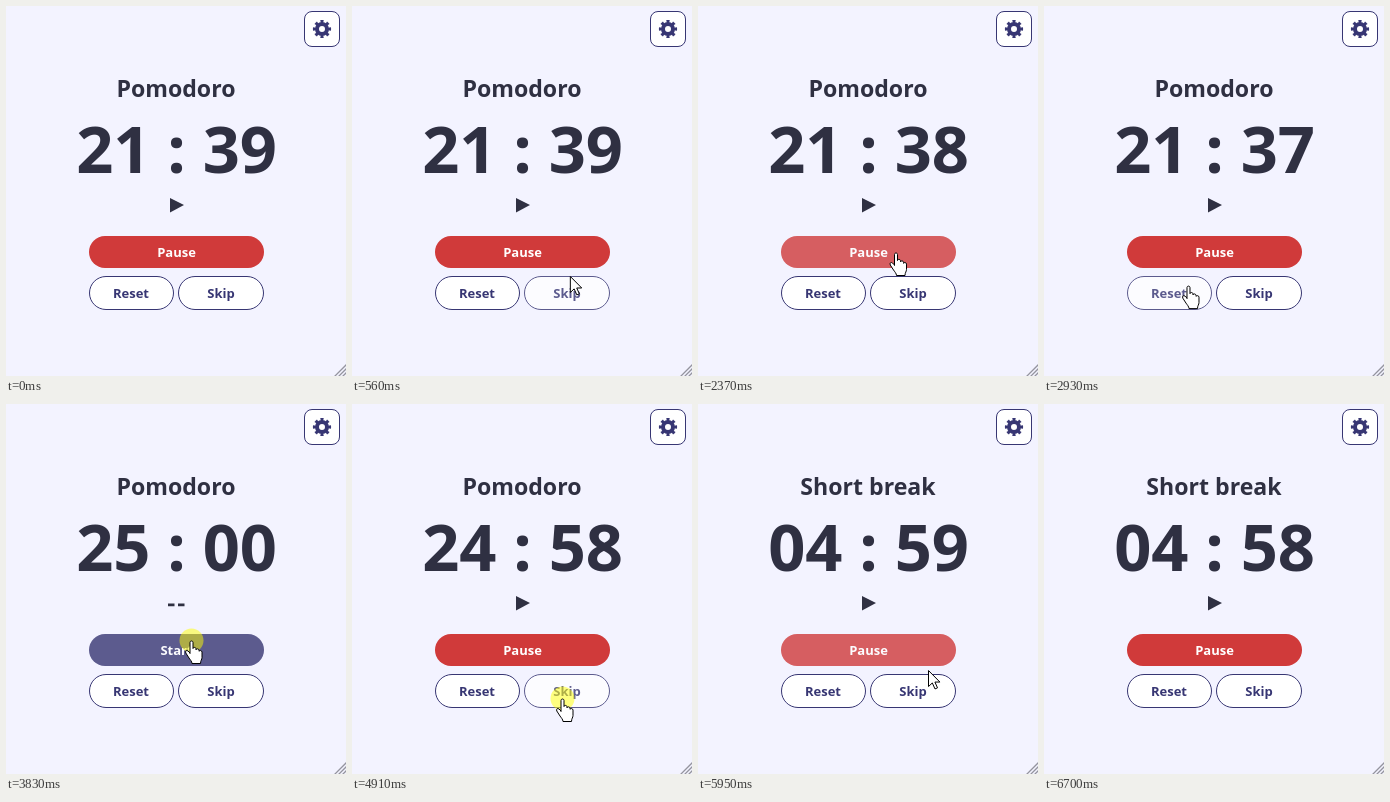
An HTML page for the animation above (7030 ms loop, 340 by 370 pixels).

```html
<!DOCTYPE html>
<html lang="en">
<head>
<meta charset="utf-8">
<title>Timer</title>
<style>
  html, body { margin: 0; width: 100%; height: 100%; overflow: hidden; background: #f3f3ff; }
  svg { display: block; width: 340px; height: 370px; }
  text { font-family: "Open Sans", "Noto Sans", sans-serif; font-weight: 700; text-anchor: middle; fill: #2f3042; }
  #title { font-size: 23.1px; }
  #clock { font-size: 65px; }
  #icon { fill: #2f3042; }
  .button text { font-size: 13px; fill: #373673; }
  .button rect, .frame { fill: #fff; stroke: #373673; }
  #main text { fill: #fff; }
  #main rect { stroke: none; fill: #373673; }
  #main.running rect { fill: #d03a3a; }
  .hover { opacity: .8; }
  .gear { fill: none; stroke: #373673; }
  .grip { fill: none; stroke: #94949e; stroke-width: 1.3; }
  #pointer path { fill: #fff; stroke: #000; stroke-linejoin: round; }
</style>
</head>
<body>
<svg viewBox="0 0 340 370">
  <rect width="340" height="370" fill="#f3f3ff"/>
  <rect class="frame" x="298.5" y="5.5" width="35" height="35" rx="7.5"/>
  <g class="gear" transform="translate(316 23)">
    <circle r="5" stroke-width="4"/>
    <circle r="7.6" stroke-width="3" pathLength="8" stroke-dasharray=".5 .5" stroke-dashoffset=".25"/>
  </g>
  <path class="grip" d="M328.5 370.5l12-12M332.5 370.5l8-8M336.5 370.5l4-4"/>

  <text id="title" x="170" y="91"></text>
  <text id="clock" x="170.5" y="167"></text>
  <path id="icon"/>

  <g class="button" id="main">
    <rect x="83" y="230" width="175" height="32" rx="16"/>
    <text x="170.5" y="251"></text>
  </g>
  <g class="button" id="reset">
    <rect x="83.5" y="270.5" width="84" height="33" rx="16.5"/>
    <text x="125" y="292">Reset</text>
  </g>
  <g class="button" id="skip">
    <rect x="172.5" y="270.5" width="85" height="33" rx="16.5"/>
    <text x="215" y="292">Skip</text>
  </g>

  <g id="pointer">
    <circle id="ripple" r="12" fill="#ff0" opacity=".5"/>
    <path id="hand" d="M-1.5 13V2c0-2 3-2 3 0v6c0-1.5 3-1.5 3 .3v1c.3-1.5 3-1.2 3 .5v1c.5-1.2 3-1 3 .8V17c0 2-1.5 3-1.5 6H.5c0-2-2-4-3-5.5l-3.2-5c-1-2 1-3.2 2.2-2l2 2z"/>
    <path id="arrow" d="M0 .5v16l3.8-3.6 2.7 6 2.5-1.1-2.6-5.8h5z"/>
  </g>
</svg>
<script>
const LOOP = 7030, STEP = 70;
const SECOND = 950;

const MODES = {
  run:   { label: "Pause",    icon: "M164 192l14 7-14 7.5z" },
  pause: { label: "Continue", icon: "M164 191.5h4v16h-4zM172 191.5h4v16h-4z" },
  idle:  { label: "Start",    icon: "M162 199.5h6.5v2.8H162zM172 199.5h6.5v2.8H172z" }
};

// Where the pointer rests, and when it presses and releases there.
const STOPS = [
  { x: 298,   y: 362,   leave: 70, presses: [] },
  { x: 198,   y: 246.5, arrive: 760,  leave: 2370, presses: [[830, 900], [1700, 1770]] },
  { x: 139,   y: 283,   arrive: 3060, leave: 3270, presses: [[3200, 3270]] },
  { x: 185.5, y: 236.5, arrive: 3760, leave: 3960, presses: [[3830, 3960]] },
  { x: 210.5, y: 294.5, arrive: 4380, leave: 4980, presses: [[4910, 4980]] },
  { x: 215,   y: 244,   arrive: 5400, leave: 5740, presses: [[5670, 5740]] },
  { x: 298,   y: 362,   arrive: 6500, presses: [] }
];
const ENTER = STOPS[0].leave, EXIT = STOPS[STOPS.length - 1].arrive;
const PRESSES = STOPS.flatMap(stop =>
  stop.presses.map(([down, up]) => ({ down, up, button: buttonAt(stop) })));

const $ = id => document.getElementById(id);
const show = (el, on) => el.style.display = on ? "" : "none";
const ease = k => k * k * (3 - 2 * k);

function buttonAt({ x, y }) {
  if (x < 83 || x > 258) return "";
  if (y >= 230 && y <= 262) return "main";
  if (y < 270 || y > 304) return "";
  return x <= 168 ? "reset" : x >= 172 ? "skip" : "";
}

function pointerAt(t) {
  const next = STOPS.findIndex(stop => stop.arrive > t);
  if (next < 0) return STOPS[STOPS.length - 1];
  const from = STOPS[next - 1], to = STOPS[next];
  const elapsed = Math.max(0, Math.floor((t - from.leave) / STEP) * STEP);
  const k = ease(elapsed / (to.arrive - from.leave));
  return { x: from.x + (to.x - from.x) * k, y: from.y + (to.y - from.y) * k };
}

// Replays every finished press up to t on the countdown.
function timerAt(t) {
  const timer = { title: "Pomodoro", left: 21 * 60 + 39.73, mode: "run" };
  let since = 0;
  const advance = now => {
    if (timer.mode === "run") timer.left -= (now - since) / SECOND;
    since = now;
  };
  for (const { up, button } of PRESSES.filter(press => press.up <= t)) {
    advance(up);
    if (button === "main") timer.mode = timer.mode === "run" ? "pause" : "run";
    if (button === "reset") Object.assign(timer, { left: 25 * 60, mode: "idle" });
    if (button === "skip") Object.assign(timer, { title: "Short break", left: 5 * 60, mode: "idle" });
  }
  advance(t + 1);
  return timer;
}

function clockText(left) {
  const seconds = Math.floor(left);
  return [seconds / 60, seconds % 60].map(n => String(Math.floor(n)).padStart(2, "0")).join(" : ");
}

function draw(t) {
  const { title, left, mode } = timerAt(t);
  $("title").textContent = title;
  $("clock").textContent = clockText(left);
  $("icon").setAttribute("d", MODES[mode].icon);
  $("main").querySelector("text").textContent = MODES[mode].label;
  $("main").classList.toggle("running", mode === "run");

  const visible = t >= ENTER && t < EXIT;
  const tip = pointerAt(t);
  const over = buttonAt(tip);
  const hovered = visible && buttonAt(pointerAt(t - STEP)); // hover trails by one step
  for (const id of ["main", "reset", "skip"]) $(id).classList.toggle("hover", id === hovered);

  show($("pointer"), visible);
  $("pointer").setAttribute("transform", `translate(${tip.x} ${tip.y})`);
  show($("hand"), over);
  show($("arrow"), !over);
  show($("ripple"), PRESSES.some(({ down, up }) => t >= down && t < up));
}

const begin = performance.now();
function tick() {
  draw((performance.now() - begin) % LOOP);
  requestAnimationFrame(tick);
}
tick();
</script>
</body>
</html>
```
